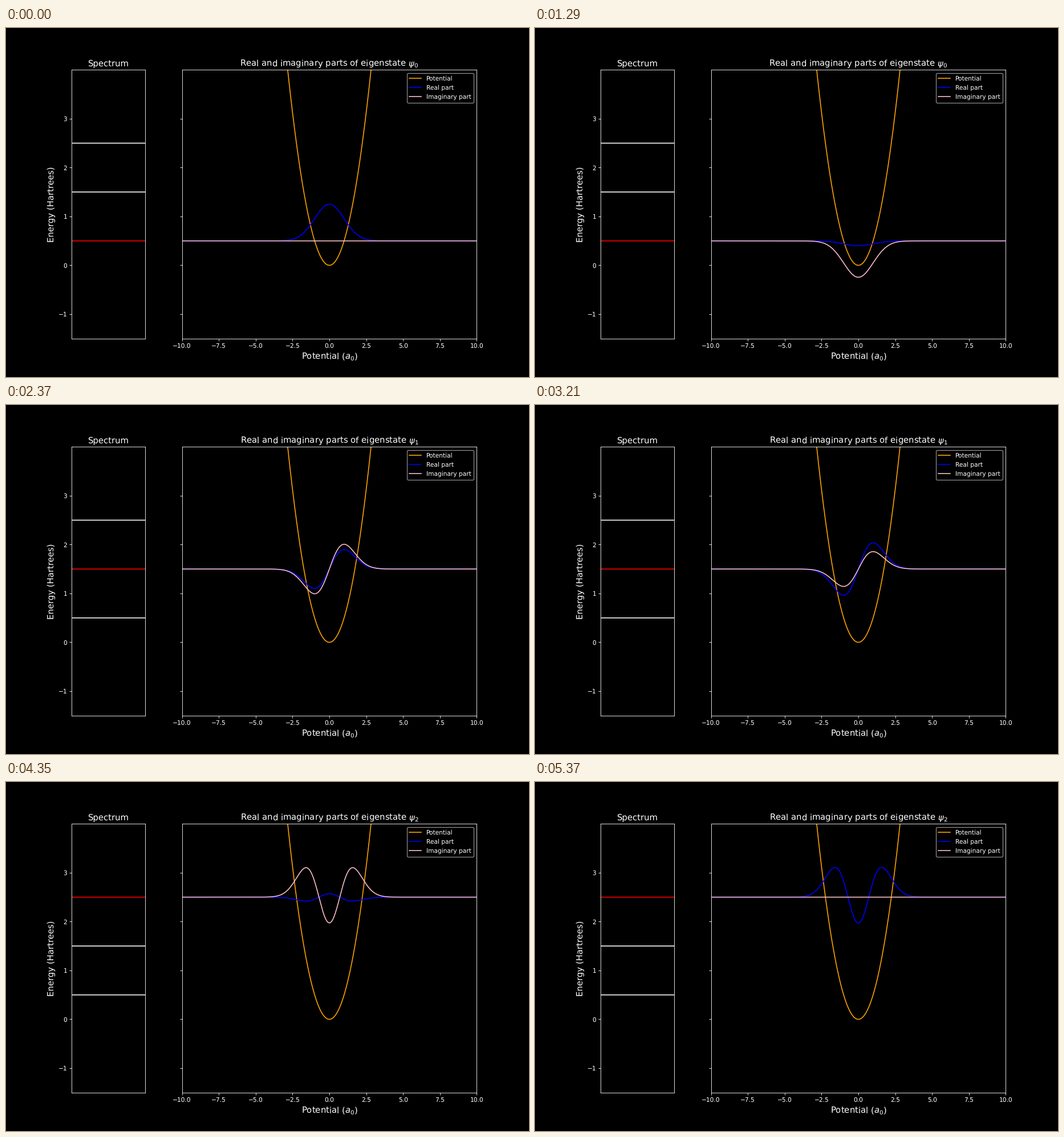
A matplotlib script that plays this animation: 917 by 611 pixels, repeating every 5400 ms.

```python
import numpy as np
import matplotlib.pyplot as plt
from matplotlib.animation import FuncAnimation

STEPS = 60          # frames per eigenstate
LEVELS = 3

plt.style.use("dark_background")
plt.rcParams["font.family"] = "DejaVu Sans"
plt.rcParams["text.hinting"] = "none"

x = np.linspace(-10, 10, 512)
gauss = np.pi ** -0.25 * np.exp(-x**2 / 2)
states = [
    gauss,
    -np.sqrt(2) * x * gauss,
    (2 * x**2 - 1) / np.sqrt(2) * gauss,
]
energies = [n + 0.5 for n in range(LEVELS)]

fig, (spec, ax) = plt.subplots(
    1, 2, sharey=True, figsize=(12.0066, 8), dpi=76.375,
    gridspec_kw={"width_ratios": [1, 4], "wspace": 0.2007},
)

spec.set_title("Spectrum", fontsize=14)
spec.set_ylabel("Energy (Hartrees)", fontsize=14)
spec.set_xlim(0, 1)
spec.set_xticks([])
spec.set_ylim(-1.5, 3.9993)
bars = [spec.plot([0, 1], [e, e], color="white", snap=False)[0]
        for e in energies]

ax.set_xlim(-10, 10)
ax.set_xlabel("Potential ($a_0$)", fontsize=14)
title = ax.set_title("", fontsize=14)
ax.plot(x, x**2 / 2, color="orange", label="Potential")
real, = ax.plot(x, x, color="blue", label="Real part", snap=False)
imag, = ax.plot(x, x, color="pink", label="Imaginary part", snap=False)
ax.legend(loc="upper right", labelspacing=0.54, borderpad=0.42)


def update(frame):
    n, k = divmod(frame, STEPS)
    phase = (n + 1) * 2 * np.pi * k / (STEPS - 1)
    wave = states[n] * np.exp(1j * phase)
    real.set_ydata(energies[n] + wave.real)
    imag.set_ydata(energies[n] + wave.imag)
    title.set_text(rf"Real and imaginary parts of eigenstate $\psi_{n}$")
    for i, bar in enumerate(bars):
        bar.set_color("red" if i == n else "white")
    return real, imag, title, *bars


anim = FuncAnimation(fig, update, frames=STEPS * LEVELS, interval=30,
                     repeat=True, repeat_delay=0, blit=False)
plt.show()
```
